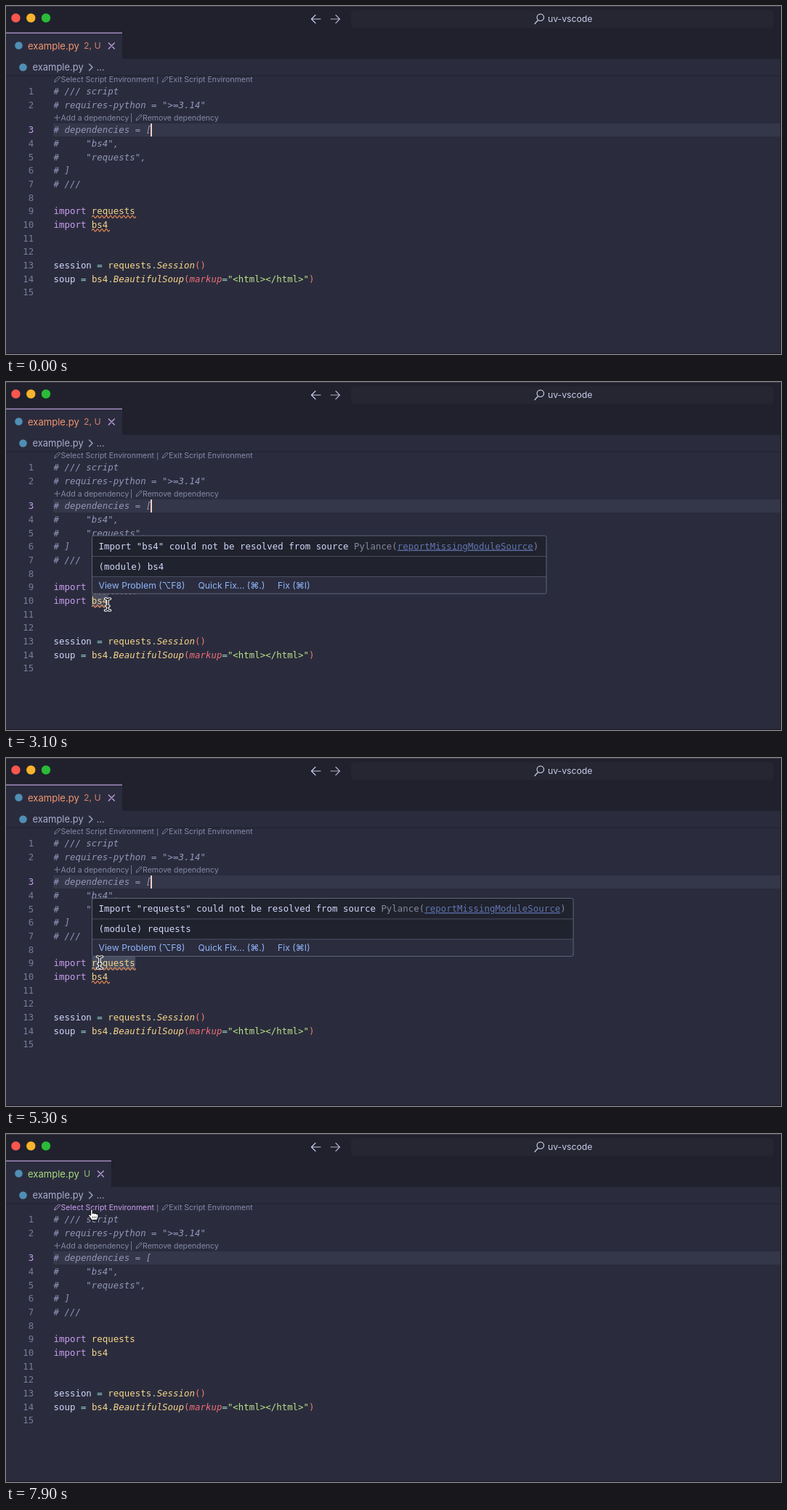
Write an HTML page that moves like this. It is 1067 by 480 pixels and loops after 8000 ms.

```html
<!DOCTYPE html>
<html lang="en">
<head>
<meta charset="utf-8">
<title>Editor hover demo</title>
<style>
  html, body { margin: 0; width: 100%; height: 100%; overflow: hidden; background: #2a2c3d; }
  svg { display: block; width: 1067px; height: 480px; }
  text { white-space: pre; }
  .ui { font-family: Inter, "Open Sans", sans-serif; }
  .code { font: 12.43px "DejaVu Sans Mono", monospace; }
  .comment { fill: #9296b8; font-style: italic; }
  .number { fill: #777b9a; }
  .keyword { fill: #cb9df0; }
  .module { fill: #f7d68c; }
  .method { fill: #f7d68c; font-style: italic; }
  .plain { fill: #d0d7fb; }
  .op { fill: #8fd3cc; }
  .paren { fill: #f07c74; }
  .param { fill: #f06d7b; font-style: italic; }
  .string { fill: #bae288; }
  .dim { fill: #8488a0; }
  .link { fill: #6076b2; text-decoration: underline; }
  .action { fill: #90b5fb; font-size: 12.2px; }
  .lens { fill: #8589a6; stroke: #8589a6; font-size: 10.52px; }
  .lens text { stroke: none; }
  .lens path { fill: none; stroke-width: .9; }
  .lens.hot { fill: #cb9df0; stroke: #cb9df0; }
  .stroke { fill: none; stroke-width: 1.2; stroke-linecap: round; stroke-linejoin: round; }
</style>
</head>
<body>
<svg viewBox="0 0 1067 480">
  <defs>
    <path id="beamShape" d="M-3.500 -8Q0 -8 0 -5.500Q0 -8 3.500 -8M0 -5.500V5.500M-3.500 8Q0 8 0 5.500Q0 8 3.500 8M-2 2H2"/>
  </defs>
  <rect width="1067" height="480" fill="#2a2c3d"/>
  <rect x="65" y="162" width="1002" height="18" fill="#343749"/>
  <g id="marks" fill="#484e60"></g>
  <g id="code"></g>
  <g id="lenses"></g>
  <path id="squiggles" class="stroke" stroke="#ea8b55"/>
  <rect id="caret" x="199" y="162" width="2" height="18" fill="#f3cfc2"/>

  <rect y="73" width="1067" height="23" fill="#2a2c3d"/>
  <rect y="95.5" width="1067" height="1.5" fill="#222431"/>
  <rect width="1067" height="73" fill="#20212c"/>
  <rect width="1067" height="1" fill="#393b46"/>
  <rect x="475" y="5.5" width="582" height="25" rx="5" fill="#252631"/>
  <circle cx="13.5" cy="16.5" r="6.2" fill="#f8564f"/>
  <circle cx="34.3" cy="16.5" r="6.2" fill="#f8b32e"/>
  <circle cx="55" cy="16.5" r="6.2" fill="#2abb38"/>
  <g class="stroke" stroke="#c8ccea">
    <path d="M433 18H420.500M426 12.500L420.500 18L426 23.500"/>
    <path d="M447 18H459.500M454 12.500L459.500 18L454 23.500" stroke="#a9adc8"/>
    <path d="M732.500 19.500L728 24.500"/>
    <circle cx="735.800" cy="15.800" r="4.700"/>
  </g>
  <text class="ui" x="746" y="22.300" font-size="12.200" fill="#c8ccea">uv-vscode</text>

  <rect id="tab" y="37" height="36" fill="#2a2c3d"/>
  <rect id="tabLine" y="36.500" height="1.300" fill="#b39ad4"/>
  <circle cx="17.500" cy="54.500" r="5.300" fill="#4f8fb3"/>
  <g class="ui" id="tabLabel">
    <text x="30" y="59.500" font-size="13.050">example.py</text>
    <text id="status" x="107" y="59.300" font-size="12.300" opacity=".82"></text>
  </g>
  <path id="close" class="stroke" stroke="#c8a6ea" d="M-4 -4L4 4M4 -4L-4 4"/>

  <circle cx="23.500" cy="84.500" r="5.300" fill="#4f8fb3"/>
  <g class="ui" fill="#a8adcc" font-size="12.950">
    <text x="36.500" y="89">example.py</text>
    <text x="124.500" y="89">...</text>
  </g>
  <path class="stroke" stroke="#a8adcc" d="M114.500 80L119 84.500L114.500 89"/>

  <g id="popups"></g>
  <rect y="479" width="1067" height="1" fill="#191a23"/>
  <rect x="1066" width="1" height="480" fill="#1d1e28"/>

  <g id="ibeam" fill="none" stroke-linecap="round">
    <use href="#beamShape" stroke="#fff" stroke-width="3.600"/>
    <use href="#beamShape" stroke="#111" stroke-width="1.300"/>
  </g>
  <g id="hand" stroke-linejoin="round">
    <path d="M-3.500 1V-6Q-2.200 -8.600 -.8 -6V-1.500Q.8 -3 2 -1.200Q3.600 -2.400 4.600 -.6Q6.600 -1.400 7 .6V3Q6.600 5.500 5.200 7.800H-2.200Q-4.200 4.400 -6.600 1.600Q-6.800 -.6 -4.800 .2Z" fill="#fff" stroke="#15161d" stroke-width="1.200"/>
    <path d="M-.5 2.500V5.500M1.800 2.500V5.500M4 2.500V5.500" stroke="#333" stroke-width=".8"/>
  </g>
</svg>
<script>
const $ = id => document.getElementById(id);
const LOOP = 8000, STEP = 100;

function add(parent, name, attrs, content = "") {
  const node = document.createElementNS("http://www.w3.org/2000/svg", name);
  for (const key in attrs) node.setAttribute(key, attrs[key]);
  node.textContent = content;
  parent.appendChild(node);
  return node;
}

// Each part is "class:text".
function codeText(parent, x, middle, parts) {
  const line = add(parent, "text", { class: "code", x, y: middle + 4.4 });
  for (const part of parts) {
    const cut = part.indexOf(":");
    add(line, "tspan", { class: part.slice(0, cut) }, part.slice(cut + 1));
  }
}

const lines = [
  ["comment:# /// script"],
  ['comment:# requires-python = ">=3.14"'],
  ["comment:# dependencies = ["],
  ['comment:#     "bs4",'],
  ['comment:#     "requests",'],
  ["comment:# ]"],
  ["comment:# ///"],
  [],
  ["keyword:import ", "module:requests"],
  ["keyword:import ", "module:bs4"],
  [], [],
  ["plain:session ", "op:= ", "module:requests", "op:.", "method:Session", "paren:()"],
  ["plain:soup ", "op:= ", "module:bs4", "op:.", "method:BeautifulSoup", "paren:(",
   "param:markup", "op:=", 'string:"<html></html>"', "paren:)"],
  []
];
const lineMiddle = n => n < 3 ? 99.4 + n * 18.6 : 171 + (n - 3) * 18.67;
lines.forEach((parts, i) => {
  const n = i + 1;
  codeText($("code"), 65.5, lineMiddle(n), parts);
  add($("code"), "text", {
    class: "code " + (n === 3 ? "keyword" : "number"),
    x: 38.3, y: lineMiddle(n) + 4.4, "text-anchor": "end"
  }, n);
});

const pencil = (x, y) => `M${x + .7} ${y + 4}l.8 -3l5 -5q1.600 -.6 2 1.600l-5 5.200z`;
const plus = (x, y) => `M${x} ${y}h8.500m-4.250 -4.250v8.500`;
function lens(x, y, icon, label) {
  const group = add($("lenses"), "g", { class: "ui lens" });
  if (icon) add(group, "path", { d: icon(x, y) });
  add(group, "text", { x: icon ? x + 9.6 : x, y: y + 3.7 }, label);
  return group;
}
const selectLens = lens(66, 101, pencil, "Select Script Environment");
lens(207, 101, null, "|");
lens(214.7, 101, pencil, "Exit Script Environment");
lens(66, 154, plus, "Add a dependency");
lens(170.8, 154, null, "|");
lens(178.5, 154, pencil, "Remove dependency");

function wave(y, periods) {
  return `M118.500 ${y}` + "q1.500 -3.200 3 0t3 0".repeat(periods);
}
$("squiggles").setAttribute("d", wave(290.7, 10) + wave(309.3, 4));

// The frame and word mark appear at once; the content fades in.
function popup(name, top, width, wordY, wordWidth) {
  const box = add($("popups"), "g", {});
  const content = add(box, "g", {});
  add(content, "rect", { x: 118.5, y: top, width, height: 80, rx: 2.5, fill: "#20222d" });
  add(content, "rect", { x: 118.5, y: top + 56, width, height: 24, fill: "#2b2d3e" });
  for (const dy of [28, 56])
    add(content, "rect", { x: 119, y: top + dy, width: width - 1, height: 1, fill: "#4b4f62" });
  codeText(content, 127.5, top + 14.3, [
    `plain:Import "${name}" could not be resolved from source `,
    "dim:Pylance(", "link:reportMissingModuleSource", "dim:)"
  ]);
  codeText(content, 127.5, top + 42.3, ["plain:(module) " + name]);
  [[127.5, "View Problem (⌥F8)"], [264.5, "Quick Fix... (⌘.)"], [374, "Fix (⌘I)"]].forEach(([x, label]) =>
    add(content, "text", { class: "ui action", x, y: top + 72.6 }, label));
  add(box, "rect", { x: 118.5, y: top, width, height: 80, rx: 2.5, fill: "none", stroke: "#5f647c" });
  const mark = add($("marks"), "rect", { x: 118, y: wordY, width: wordWidth, height: 18 });
  return (t, from, to) => {
    const on = between(t, from, to);
    show(box, on);
    show(mark, on);
    content.setAttribute("opacity", t - from < STEP ? .3 : 1);
  };
}
const show = (node, on) => { node.style.display = on ? "" : "none"; };
const between = (t, from, to) => t >= from && t < to;
const bs4Popup = popup("bs4", 212, 625.5, 292.5, 23);
const requestsPopup = popup("requests", 193.5, 662.5, 274, 60);

// Pointer stops: time, x, y.
const stops = [
  [900, 365, 328], [1700, 140, 307], [3400, 140, 307], [3800, 103, 272], [4000, 103, 272],
  [4400, 129, 282], [5600, 129, 282], [6300, 123, 111], [6700, 123, 111], [7000, 120, 111], [8000, 120, 111]
];
function pointerAt(t) {
  const i = Math.max(1, stops.findIndex(stop => stop[0] > t));
  const [t0, x0, y0] = stops[i - 1], [t1, x1, y1] = stops[i];
  const u = Math.max(0, (t - t0) / (t1 - t0));
  const eased = u * u * (3 - 2 * u);
  return [x0 + (x1 - x0) * eased, y0 + (y1 - y0) * eased];
}

function draw(t) {
  const [x, y] = pointerAt(t);
  const onLens = y < 114;
  for (const id of ["ibeam", "hand"]) $(id).setAttribute("transform", `translate(${x} ${y})`);
  show($("ibeam"), t >= 900 && !onLens);
  show($("hand"), onLens);
  selectLens.classList.toggle("hot", onLens);
  show($("caret"), t % 1000 < 500);

  bs4Popup(t, 2100, 3500);
  requestsPopup(t, 4700, 6000);

  show($("squiggles"), t < 7400);
  const resolved = t >= 7700, tabWidth = resolved ? 145 : 160;
  $("tab").setAttribute("width", tabWidth);
  $("tabLine").setAttribute("width", tabWidth);
  $("tabLabel").setAttribute("fill", resolved ? "#a8db7c" : "#f7946e");
  $("status").textContent = resolved ? "U" : "2, U";
  $("close").setAttribute("transform", `translate(${tabWidth - 14.7} 55)`);
}

const start = performance.now();
function tick(now) {
  const t = Math.max(0, now - start) % LOOP;
  draw(Math.floor(t / STEP) * STEP);
  requestAnimationFrame(tick);
}
draw(0);
requestAnimationFrame(tick);
</script>
</body>
</html>
```
